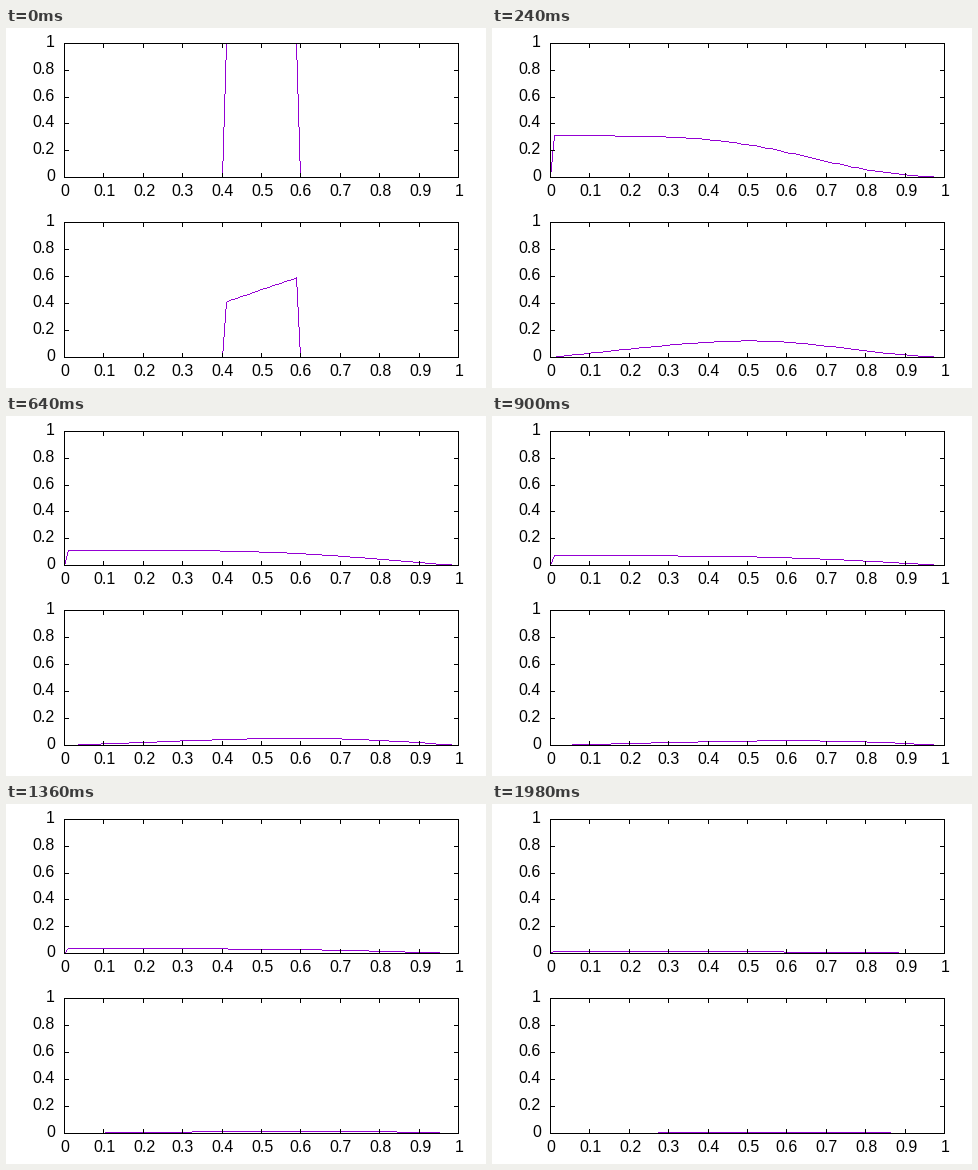
These frames come from a looping animation (480 by 360 pixels, 2 s). A matplotlib script:

```python
import numpy as np
import matplotlib.pyplot as plt
from matplotlib.animation import FuncAnimation

plt.rcParams["font.family"] = "Liberation Sans"
plt.rcParams["text.hinting"] = "default"

W, H, DPI = 480, 360, 100
PX = 72 / DPI                     # one pixel in points
FRAMES, INTERVAL = 100, 20
LEFT, RIGHT = 58, 452
PANELS = [(15, 149), (194, 329)]  # top and bottom pixel rows
TICK = 4
PURPLE, BLACK = (148, 0, 211, 255), (0, 0, 0, 255)

# Spreading of a viscous ring: S_t = S_xx / x^2 with S = x * sigma,
# solved by one implicit Euler step per frame.
N, DT = 100, 1e-3
x = np.linspace(0, 1, N + 1)
inner = x[1:-1]


def evolve():
    lap = (np.eye(N - 1, k=1) - 2 * np.eye(N - 1) + np.eye(N - 1, k=-1)) * N**2
    step = np.linalg.inv(np.eye(N - 1) - DT * lap / inner[:, None] ** 2)
    s = np.where((inner > 0.405) & (inner < 0.595), inner, 0.0)
    states = []
    for _ in range(FRAMES):
        states.append(s)
        s = step @ s
    return states


def snap(v):
    return np.floor(np.asarray(v) + 0.5).astype(int)


def to_x(v):
    return LEFT + snap(v * (RIGHT - LEFT))


def to_y(v, panel):
    top, bottom = panel
    return bottom - snap(v * (bottom - top))


def line(img, x0, y0, x1, y1, color):
    """One-pixel line without smoothing."""
    dx, dy = x1 - x0, y1 - y0
    if abs(dy) > abs(dx) and dy < 0:
        x0, y0, dx, dy = x1, y1, -dx, -dy
    n = max(abs(dx), abs(dy), 1)
    k = np.arange(n + 1)
    px = x0 + np.sign(dx) * snap(k * abs(dx) / n)
    py = y0 + np.sign(dy) * snap(k * abs(dy) / n)
    img[py, px] = color


def polyline(img, xs, ys, color):
    for seg in zip(xs[:-1], ys[:-1], xs[1:], ys[1:]):
        line(img, *seg, color)


fig = plt.figure(figsize=(W / DPI, H / DPI), dpi=DPI, facecolor="white")
ax = fig.add_axes([0, 0, 1, 1])
ax.axis("off")


def label(px, py, value, ha):
    ax.text(px, py, f"{value:g}", ha=ha, va="baseline", fontsize=16 * PX)


def draw_axes(img, panel):
    top, bottom = panel
    polyline(img, [LEFT, RIGHT, RIGHT, LEFT, LEFT],
             [top, top, bottom, bottom, top], BLACK)
    for v in np.arange(11) / 10:
        px = to_x(v)
        line(img, px, bottom, px, bottom - TICK, BLACK)
        line(img, px, top, px, top + TICK, BLACK)
    for v in np.arange(6) / 5:
        py = to_y(v, panel)
        line(img, LEFT, py, LEFT + TICK, py, BLACK)
        line(img, RIGHT, py, RIGHT - TICK, py, BLACK)


frame_art = np.zeros((H, W, 4), np.uint8)
for p in PANELS:
    draw_axes(frame_art, p)
    for v in np.arange(11) / 10:
        label(to_x(v) + 1, p[1] + 19, v, "center")
    for v in np.arange(6) / 5:
        label(49, to_y(v, p) + 4, v, "right")

states = evolve()
xs = to_x(x)


def render(i):
    s = states[i]
    img = np.zeros_like(frame_art)
    for panel, vals in zip(PANELS, (s / inner, s)):
        polyline(img, xs, to_y(np.pad(vals, 1), panel), PURPLE)
    return np.where(frame_art[..., 3:] > 0, frame_art, img)


stage = ax.imshow(render(0), extent=(0, W, H, 0), aspect="auto",
                  interpolation="nearest")


def update(i):
    stage.set_data(render(i))
    return [stage]


anim = FuncAnimation(fig, update, frames=FRAMES, interval=INTERVAL,
                     repeat=True, repeat_delay=0)
plt.show()
```
